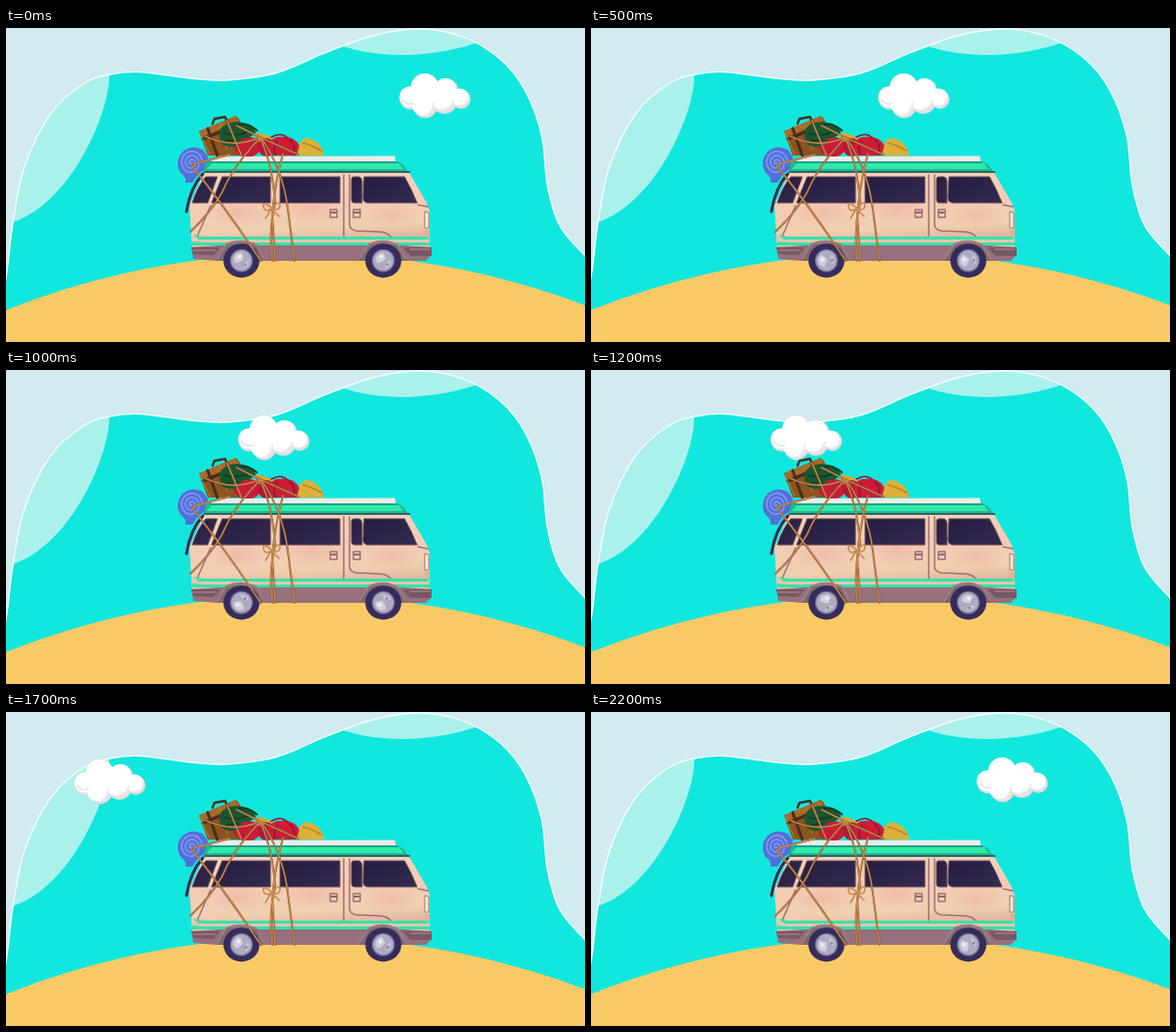
Recreate the animation shown at these times as an HTML page. Size 600x325 px, loop 2300 ms.

```html
<!DOCTYPE html>
<html lang="en">
<head>
<meta charset="utf-8">
<title>Camper van</title>
<style>
html, body { margin: 0; width: 100%; height: 100%; overflow: hidden; background: #d1ebf0; }
svg { display: block; width: 600px; height: 325px; }
.line { fill: none; stroke-linecap: round; stroke-linejoin: round; }
</style>
</head>
<body>
<svg viewBox="0 0 600 325">
  <defs>
    <linearGradient id="paint" x2=".15" y2="1">
      <stop stop-color="#f6d3b9"/><stop offset=".5" stop-color="#f3cbb5"/>
      <stop offset=".8" stop-color="#efd0ae"/><stop offset="1" stop-color="#dfae9d"/>
    </linearGradient>
    <linearGradient id="glass" x2="1" y2="1">
      <stop stop-color="#251c40"/><stop offset="1" stop-color="#342a50"/>
    </linearGradient>
    <radialGradient id="blush">
      <stop stop-color="#ee9c92" stop-opacity=".35"/><stop offset="1" stop-color="#ee9c92" stop-opacity="0"/>
    </radialGradient>
    <path id="blob"/>
    <clipPath id="inside"><use href="#blob"/></clipPath>
    <g id="puffs">
      <circle cx="12" cy="25" r="11.5"/><circle cx="27" cy="14.5" r="14.5"/>
      <circle cx="49" cy="17" r="12"/><circle cx="64" cy="26" r="10"/>
      <circle cx="27" cy="33" r="12.5"/><circle cx="47" cy="28" r="13"/>
    </g>
    <g id="wheel">
      <ellipse rx="18.7" ry="17.6" fill="#352c5c"/>
      <circle r="12" fill="#6d6890"/><circle r="10.7" fill="#b0a9c2"/>
      <g class="spin">
        <path d="M-8-3Q-5-9 1-8L2-1Q-3 3-7 2Z" fill="#d3d0dd"/>
        <path d="M3 2L8-1Q8 6 2 8Z" fill="#c9c4d5"/>
        <circle cx="-2" cy="-4" r="2" fill="#efedf2"/><circle cx="4" cy="4" r="1.4" fill="#898497"/>
      </g>
    </g>
  </defs>

  <use href="#blob" fill="#12e7de"/>
  <g clip-path="url(#inside)" fill="#aaf1ec">
    <path d="M107 40V50C107 88 66 187 0 203V40Z"/>
    <path d="M336 14C380 33 446 33 499 11V-5H336Z"/>
  </g>
  <use href="#blob" class="line" stroke="#f4ffff" stroke-width="1.3"/>
  <circle cx="306.5" cy="1063.3" r="830" fill="#f9c966"/>

  <g id="cloud">
    <use href="#puffs" x=".6" y="1" fill="#b9dce0"/>
    <use href="#puffs" fill="#e4e3e6"/>
    <g fill="#fff">
      <circle cx="11.5" cy="24" r="10.5"/><circle cx="27" cy="14.5" r="14.3"/>
      <circle cx="48" cy="16.5" r="11.3"/><circle cx="63" cy="24.5" r="9"/>
      <circle cx="25" cy="31.5" r="11.7"/><circle cx="45" cy="25.5" r="12"/>
    </g>
    <path class="line" d="M36 31Q36 39 29 43M57 28Q54 36 48 37M15 31Q8 33 4 27" stroke="#e9e8eb" stroke-width="2"/>
  </g>

  <!-- luggage -->
  <path d="M301 132Q303 114 312 114Q326 116 330 132Z" fill="#dcb038"/>
  <path class="line" d="M308 119Q319 122 327 127" stroke="#b98427" stroke-width="1.5"/>
  <path d="M255 117L261 108L276 113L279 126H258Z" fill="#dda631"/>
  <path class="line" d="M214 99L216 94L227 92L229 97" stroke="#46301f" stroke-width="2.4"/>
  <path d="M200 107L238 91Q243 94 244 102L246 132H209Z" fill="#8c541e"/>
  <path d="M200 107L238 91L241 97L203 113Z" fill="#a86b29"/>
  <path class="line" d="M209 104L219 132M229 96L235 114M204 115L240 100" stroke="#4a2c1a" stroke-width="3"/>
  <path class="line" d="M202 110L211 131M222 99L229 126" stroke="#b97c36"/>
  <ellipse cx="250" cy="123" rx="14" ry="10.5" fill="#cb1a38"/>
  <ellipse cx="270" cy="123.5" rx="9" ry="9.5" fill="#b81734"/>
  <path d="M272 132Q269 117 280 113Q299 110 304 122L301 132Z" fill="#d01a37"/>
  <path class="line" d="M275 113Q285 107 292 114M281 117Q276 124 279 131M294 116Q301 121 298 130" stroke="#891b32" stroke-width="1.6"/>
  <path d="M221 108Q224 98 239 97Q256 98 259 108Q253 115 245 114L240 122Q228 125 222 118Z" fill="#1a5730"/>
  <path class="line" d="M239 101Q250 97 260 106M226 109Q239 113 252 107M228 117L240 116" stroke="#123f26" stroke-width="2"/>
  <path d="M183 128Q193 120 204 126L209 133V145L200 150L193 160H186Q187 154 181 150Q174 139 183 128Z" fill="#536fd8"/>
  <path id="roll" class="line" stroke="#7f96f3" stroke-width="1.7"/>

  <!-- body -->
  <path d="M208 137L403 137L411 141L419 151H204Z" fill="#20b892"/>
  <path d="M212 138L220 133L403 132.5L404 138Z" fill="#f3ebe8"/>
  <path class="line" d="M212 139H405" stroke="#1d8c80" stroke-width="1"/>
  <path d="M213 140H407L412 146H208Z" fill="#2eeaa9"/>
  <path class="line" d="M206 149H418" stroke="#286669" stroke-width="2"/>
  <path d="M205 150H418L436 181L439 190V227H193L190 184Z" fill="url(#paint)"/>
  <g fill="url(#blush)">
    <ellipse cx="318" cy="188" rx="30" ry="14"/><ellipse cx="400" cy="194" rx="28" ry="13"/>
    <ellipse cx="240" cy="192" rx="30" ry="13"/>
  </g>
  <path class="line" d="M207 151.5H417" stroke="#f4d0bd" stroke-width="1.3"/>
  <path class="line" d="M204 151Q191 165 187 190" stroke="#332b4d" stroke-width="3"/>
  <g fill="url(#glass)" stroke="#6c4e56">
    <path d="M207 154H219L209 181H193Q198 165 207 154Z"/>
    <path d="M224 154H274V181H213Z"/>
    <path d="M284 154H346V181H284Z"/>
    <path d="M358 156Q358 154 361 154H366Q369 155 369 159V181H361Q358 181 358 178Z"/>
    <path d="M371 154H413Q420 166 426 181H374Q370 180 370 176Z"/>
  </g>
  <g class="line" stroke="#a06f74" stroke-width="1.5">
    <path d="M350 152V236M356 152V203Q356 209 363 210L388 211Q397 212 400 218"/>
    <path d="M336 188H343V196H336ZM360 188H367V196H360ZM212 184L198 216M427 183L437 185"/>
  </g>
  <path class="line" d="M337 191H342M361 191H366" stroke="#694b58" stroke-width="1.5"/>
  <path d="M192 214L204 216L439 217V226H193Z" fill="#e6c6ac"/>
  <path d="M194 214L204 216H438V219H200ZM193 221L204 222H439V225H193Z" fill="#36e2ac"/>
  <path d="M192 227L220 225H413L440 227L440 236L435 241H218L194 239Z" fill="#96707c"/>
  <path d="M192 227H222L215 235L194 234ZM411 227H441V236H419Z" fill="#765867"/>
  <path class="line" d="M194 230H217M419 229H439" stroke="#a37c80" stroke-width="1.4"/>
  <path d="M219 241L228 223Q244 216 260 224L270 241ZM366 241L376 223Q391 216 406 224L416 241Z" fill="#7f6870"/>
  <path class="line" d="M219 239L228 224Q244 218 260 225L268 240M366 239L376 224Q391 218 406 225L414 239" stroke="#a07d80" stroke-width="1.8"/>
  <path d="M434 190L438 191V207H434Z" fill="#fff0d5" stroke="#9c7477"/>
  <path d="M434 209H439V215H434Z" fill="#e2b48c"/>
  <use href="#wheel" x="244" y="240.8"/>
  <use href="#wheel" x="391" y="240.8"/>

  <!-- ropes -->
  <g class="line" stroke="#7c4f33" stroke-width="2"><use href="#ropes"/></g>
  <g class="line" stroke="#c98a4c" stroke-width="1.3">
    <path id="ropes" d="M264 113Q235 143 224 170Q213 190 191 211M192 142Q227 185 264 241M263 113Q276 140 279 181Q272 208 276 241M264 113Q287 146 292 187L299 241M287 130Q278 163 276 195L279 241M206 112Q238 126 263 113L303 131M229 96L244 132M263 113L239 101M194 141L232 131"/>
    <path d="M275 186Q265 178 267 186Q269 191 275 187Q284 177 284 184Q283 190 275 187L269 197M275 187L283 195" stroke-width="1.6"/>
  </g>
</svg>
<script>
const $ = id => document.getElementById(id);

// Smooth curve through a few points.
function curve(p) {
  let d = `M${p[0]}`;
  for (let i = 0; i < p.length - 1; i++) {
    const a = p[i - 1] || p[i], b = p[i], c = p[i + 1], e = p[i + 2] || c;
    const c1 = b.map((v, k) => v + (c[k] - a[k]) / 6);
    const c2 = c.map((v, k) => v - (e[k] - b[k]) / 6);
    d += `C${c1} ${c2} ${c}`;
  }
  return d;
}

$("blob").setAttribute("d", curve([
  [-2, 270], [2, 245], [7, 203], [19, 144], [46, 89], [80, 58], [108, 48], [138, 45.5],
  [190, 52], [230, 54], [282, 46], [330, 26], [380, 8], [428, 1], [473, 9],
  [513, 33], [538, 65], [555, 111], [561, 163], [574, 205], [602, 238]
]) + "V340H-2Z");

const spiral = Array.from({ length: 30 }, (_, i) => {
  const a = i * .65, r = i / 29;
  return [192 + 12 * r * Math.cos(a), 139.5 + 13 * r * Math.sin(a)];
});
$("roll").setAttribute("d", curve(spiral));

// Cloud positions: time, x, y.
const keys = [
  [0, 407, 47], [500, 297, 47], [1000, 240, 47], [1400, 125, 47],
  [1700, 70, 49], [1900, 67, 51], [2000, 72, 51], [2200, 399, 47], [2300, 407, 47]
];
const LOOP = 2300, STEP = 100;

function slope(i, k) {
  if (!i || i === keys.length - 1) return 0;
  const [a, b, c] = keys.slice(i - 1, i + 2);
  const m = (b[k] - a[k]) / (b[0] - a[0]), n = (c[k] - b[k]) / (c[0] - b[0]);
  return m * n > 0 ? 2 * m * n / (m + n) : 0;
}

function position(t, k) {
  const i = keys.findIndex(q => q[0] > t) - 1;
  const a = keys[i], b = keys[i + 1], h = b[0] - a[0], u = (t - a[0]) / h;
  const s = u * u * (3 - 2 * u);
  return a[k] + (b[k] - a[k]) * s
    + h * u * (1 - u) * ((1 - u) * slope(i, k) - u * slope(i + 1, k));
}

const spins = document.querySelectorAll(".spin");

function draw(now) {
  const t = Math.floor(now % LOOP / STEP) * STEP;
  $("cloud").setAttribute("transform", `translate(${position(t, 1)} ${position(t, 2)})`);
  spins.forEach(s => s.setAttribute("transform", `rotate(${t / LOOP * 1440})`));
  requestAnimationFrame(draw);
}
draw(performance.now());
</script>
</body>
</html>
```
